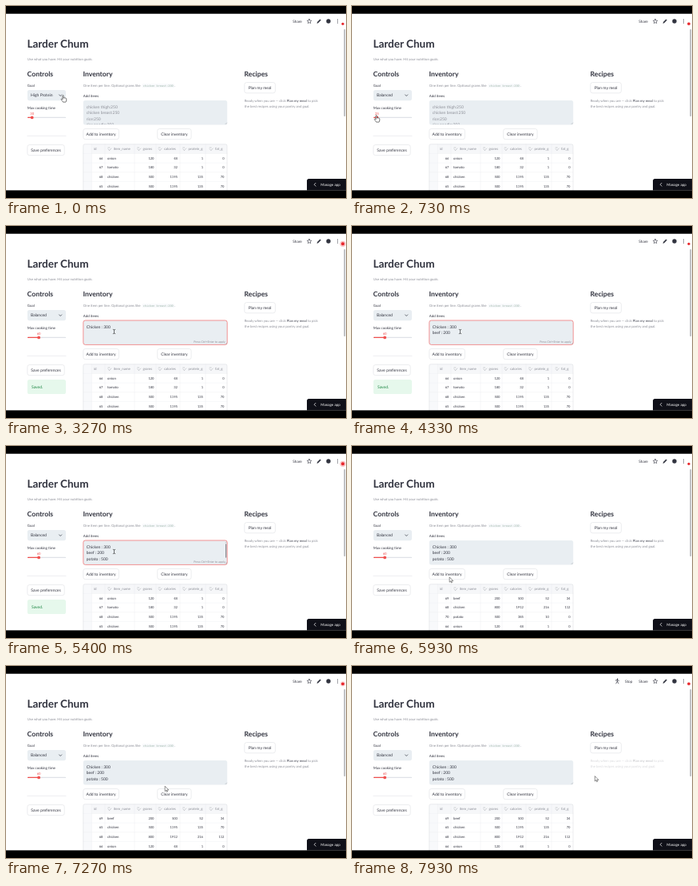
An HTML page that plays this animation: 426 px wide and 240 px high, repeating every 8000 ms.

```html
<!DOCTYPE html>
<html lang="en">
<head>
<meta charset="utf-8">
<title>Meal planner</title>
<style>
html, body { margin: 0; width: 100%; height: 100%; overflow: hidden; background: #fff; }
svg { display: block; width: 100vw; height: 100vh; font-family: Lato, "Open Sans", sans-serif; text-rendering: geometricPrecision; }
.mono { font-family: "DejaVu Sans Mono", monospace; }
</style>
</head>
<body>
<svg id="stage" viewBox="0 0 426 240" xmlns="http://www.w3.org/2000/svg"></svg>
<script>
const LOOP = 8000;
const INK = '#31333f', GREY = '#8b8d96', LINE = '#d9dadf', FIELD = '#e9eef2', RED = '#f0504f';
const stage = document.getElementById('stage');

const clamp = (v, a = 0, b = 1) => Math.min(b, Math.max(a, v));
const smooth = v => v * v * (3 - 2 * v);
const ramp = (t, a, b) => smooth(clamp((t - a) / (b - a)));
const within = (t, a, b) => t >= a && t < b;

// Value at time t along [time, ...values] points.
function track(points, t, ease = v => v) {
  let i = 0;
  while (i < points.length - 2 && t >= points[i + 1][0]) i++;
  const [a, b] = [points[i], points[i + 1]];
  const p = ease(clamp((t - a[0]) / (b[0] - a[0])));
  return a.slice(1).map((v, k) => v + (b[k + 1] - v) * p);
}

const text = (x, y, s, size, fill = INK, extra = '') =>
  `<text x="${x}" y="${y}" font-size="${size}" fill="${fill}" ${extra}>${s}</text>`;
const rect = (x, y, w, h, fill, extra = '') =>
  `<rect x="${x}" y="${y}" width="${w}" height="${h}" fill="${fill}" ${extra}/>`;
const path = (d, stroke, w = 0.6, fill = 'none') =>
  `<path d="${d}" stroke="${stroke}" stroke-width="${w}" fill="${fill}" stroke-linecap="round" stroke-linejoin="round"/>`;
const dot = (x, y, r, fill, extra = '') => `<circle cx="${x}" cy="${y}" r="${r}" fill="${fill}" ${extra}/>`;
const at = (x, y, s) => `<g transform="translate(${x} ${y})">${s}</g>`;

const END = 'text-anchor="end"', MID = 'text-anchor="middle"', BOLD = 'font-weight="700"';

function button(x, y, w, label, hot) {
  const c = hot ? RED : LINE;
  return rect(x, y, w, 13.2, '#fff', `rx="2.6" stroke="${c}" stroke-width=".5"`) +
    text(x + w / 2, y + 8.3, label, 5, hot ? RED : INK, MID);
}

// Timeline
const T = {
  open: 130, pick: 360, savePrefs: 1260, saved: 1450, focus: 1730,
  add: 5620, added: 5830, saveTable: 6560, stored: 6780, plan: 7740, dim: 7870
};

const pointer = [
  [0, 71, 112], [130, 71, 112], [300, 47, 126], [380, 47, 126], [620, 30, 137], [760, 30, 137],
  [1000, 40, 137], [1060, 40, 137], [1240, 50, 179], [1400, 50, 179], [1680, 135.5, 132],
  [5420, 135.5, 132], [5600, 119, 160], [5850, 119, 160], [6200, 142, 191], [6900, 142, 191],
  [7300, 200, 150], [7680, 314, 103], [7770, 314, 103], [7920, 304.3, 138], [8000, 304.3, 138]
];

const NOTE = 'Chicken : 300\nbeef : 200\npotato : 500';
const typing = [[1730, 0.5], [1930, 3.5], [2900, 13], [3400, 13], [4150, 24], [4400, 25], [5200, 37]];
const HINT = ['chicken thigh:250', 'chicken breast:250', 'rice:250', 'rice noodle:250'];

const onion = [66, 'onion', 120, 48, 1, 0];
const tomato = [67, 'tomato', 180, 32, 1, 0];
const chicken = id => [id, 'chicken', 500, 1195, 135, 70];
const beef = [69, 'beef', 200, 500, 52, 34];
const potato = [70, 'potato', 500, 385, 10, 0];
const more = [68, 'chicken', 800, 1912, 216, 112];

function rowsAt(t) {
  if (t < T.added) return [onion, tomato, chicken(68), chicken(65)];
  if (t < T.stored) return [beef, more, potato, onion, tomato, chicken(65)];
  return [beef, chicken(65), more, onion, tomato, potato];
}

function table(rows) {
  const x0 = 96.8, y0 = 172.8, w = 180.2, pitch = 11.65, n = 12, h = 141.2;
  const edges = [107.3, 124, 161, 188, 218, 250];
  const heads = [['id', 110], ['item_name', 134.7], ['grams', 171.5], ['calories', 198], ['protein_g', 228.5], ['fat_g', 262]];
  const right = [121.5, 0, 185.5, 215, 247, 273.5];
  let s = rect(x0, y0, w, h, '#fff', 'rx="2"') +
    rect(x0, y0, w, pitch, '#f6f7f9') + rect(x0, y0, 10.5, h, '#f8f9fb') +
    rect(x0, y0 + pitch * (rows.length + 1), w, pitch, '#f4f6f7');
  for (let i = 1; i <= n; i++) s += path(`M${x0} ${y0 + i * pitch}h${w}`, '#e7e9ec', 0.35);
  for (const x of edges) s += path(`M${x} ${y0}v${h}`, '#e7e9ec', 0.35);
  heads.forEach(([label, x], i) => {
    s += text(x, y0 + 7.2, label, 4.4, GREY);
    if (i) s += path(`M${x - 6.8} ${y0 + 4.2}h2M${x - 6.8} ${y0 + 6}l1.6 1.6M${x - 5} ${y0 + 7.6}l2.2-2.4`, GREY, 0.4);
  });
  rows.forEach((row, r) => row.forEach((v, i) => {
    const y = y0 + pitch * (r + 1) + 7.3;
    s += i === 1 ? text(127, y, v, 4.35) : text(right[i], y, v, 4.1, INK, END);
  }));
  return s + rect(x0, y0, w, h, 'none', `rx="2" stroke="${LINE}" stroke-width=".5"`);
}

function controls(t) {
  const [mins] = track([[0, 30], [560, 30], [720, 25], [760, 25], [1000, 60]], t);
  const value = Math.round(mins / 5) * 5;
  const x = 27 + (value - 10) / 170 * 48;
  const goal = t < T.pick ? 'High Protein' : 'Balanced';
  let s = text(26.6, 87.7, 'Controls', 8.6, INK, BOLD) + text(26.8, 101, 'Goal', 4.4) +
    rect(26.8, 105, 48.2, 13.2, FIELD, 'rx="2.6"') + text(31, 113.3, goal, 5) +
    path('M66.6 110.9l1.6 1.6 1.6-1.6', INK, 0.7) +
    text(26.8, 128.8, 'Max cooking time', 4.5) +
    rect(27, 138.7, 48, 1.3, '#dfe2e7', 'rx=".6"') + rect(27, 138.7, x - 27, 1.3, RED, 'rx=".6"') +
    dot(x, 139.4, 1.9, RED) + text(x, 135.5, value, 4.2, RED, MID) +
    path('M26.8 162.4h48.2', LINE, 0.45) +
    button(26.8, 173.5, 46.4, 'Save preferences', within(t, T.savePrefs - 40, T.savePrefs + 160));
  if (within(t, T.saved, T.added))
    s += rect(26.8, 192, 48.2, 18, '#e6f8ec', 'rx="2.6"') + text(32, 202.8, 'Saved.', 5, '#1e8745');
  if (within(t, T.open, T.pick)) {
    s += rect(26.8, 119.5, 48.2, 37, '#fff', `rx="2.6" stroke="${LINE}" stroke-width=".5"`) +
      rect(27.4, 121, 47, 11, '#f0f2f5');
    ['Balanced', 'High Protein', 'Low Carb'].forEach((o, i) => s += text(31, 128.3 + i * 11.4, o, 5));
  }
  return s;
}

function inventory(t) {
  const focus = within(t, T.focus, T.add);
  const note = NOTE.slice(0, Math.floor(track(typing, t)[0]));
  const typed = t >= T.focus && note;
  const lines = typed ? note.split('\n') : HINT;
  const last = lines.length - 1;
  let s = text(96.6, 87.7, 'Inventory', 8.6, INK, BOLD) +
    text(96.8, 101, 'One item per line. Optional grams like', 4.35, GREY) +
    rect(170.5, 97.3, 40.5, 5, '#f8f9fb', 'rx="1"') +
    text(171.7, 100.8, 'chicken breast:200', 3.5, '#9db5aa', 'class="mono"') + text(211.3, 101, '.', 4.35, GREY) +
    text(96.8, 113.6, 'Add items', 4.4) +
    rect(96.8, 118, 180.4, 30.4, FIELD, `rx="2.6" ${focus ? `stroke="${RED}" stroke-width=".6"` : ''}`) +
    '<g clip-path="url(#area)">' +
    lines.map((l, i) => text(100.8, 127.6 + i * 7.6, l, 5, typed ? INK : GREY)).join('');
  if (focus && (t - T.focus) % 1000 < 500) {
    const units = { i: .24, ' ': .19, ':': .24, C: .65, e: .53, c: .46, k: .5, f: .34, t: .37, a: .49 };
    const w = typed ? [...lines[last]].reduce((sum, c) => sum + (units[c] || 0.57), 0) * 5 : 0;
    s += rect(101.2 + w, 123 + (typed ? last : 0) * 7.6, 0.4, 5.8, INK);
  }
  s += '</g>';
  if (focus) s += text(274.5, 145.5, 'Press Ctrl+Enter to apply', 3.6, GREY, END);
  if (focus && typed && last > 1)
    s += rect(275, 122.2, 1.2, 17.5, '#85888d', 'rx=".6"') +
      path('M275 120.8l.6-.8.6.8M275 145.4l.6.8.6-.8', '#85888d', 0.35);
  s += path('M274.9 147.6l1.7-1.7M276 147.6l.6-.6', '#85888d', 0.3);
  return s + button(96.8, 153.5, 44.6, 'Add to inventory', within(t, T.add - 40, T.add + 200)) +
    button(189.7, 153.5, 42.4, 'Clear inventory') + table(rowsAt(t)) +
    button(96.8, 320.8, 53.6, 'Save inventory table', within(t, T.saveTable - 40, T.saveTable + 200));
}

function recipes(t) {
  return text(298.6, 87.7, 'Recipes', 8.6, INK, BOLD) +
    button(298.8, 95.6, 38.6, 'Plan my meal', within(t, T.plan - 60, T.plan + 70)) +
    `<g opacity="${t >= T.dim ? 0.33 : 1}">` +
    text(298.8, 119.5, 'Ready when you are — click <tspan fill="#5b5d68" font-weight="600">Plan my meal</tspan> to pick', 4.3, GREY) +
    text(298.8, 127, 'the best recipes using your pantry and goal.', 4.3, GREY) + '</g>';
}

function header(t) {
  const busy = within(t, T.savePrefs, T.saved) || within(t, T.add, T.added) ||
    within(t, T.saveTable, T.stored) || t >= T.plan;
  let s = rect(0, 10, 426, 17.6, '#fff') + text(359.3, 20.8, 'Share', 4.7) +
    path('M380 16.3l.8 1.8 2 .2-1.5 1.3.4 2-1.7-1-1.7 1 .4-2-1.5-1.3 2-.2z', INK, 0.6) +
    path('M389.8 21.4l.4-1.5 3.2-3.2 1.1 1.1-3.2 3.2z', INK, 0.3, INK) +
    dot(404, 19, 2.7, INK) + [17, 19, 21].map(y => dot(415.5, y, 0.6, INK)).join('');
  if (busy) {
    const legs = Math.floor(t / 130) % 2 ? 'M332.4 19.3l-1.6 2.6M332.4 19.3l1.5 2.6' : 'M332.4 19.3l-.6 1.4-1.5.3M332.4 19.3l1.3 1-.3 1.7';
    s += dot(332.6, 16.2, 0.8, INK) + path('M332.4 17.5v1.8M330.2 18l2.2-.5 2 .9' + legs, INK, 0.7) +
      text(342, 20.8, 'Stop', 4.7);
  }
  return s;
}

const arrow = path('M0 0v6l1.5-1.3.9 2.1.9-.4-.9-2H4.3z', '#222', 0.5, '#fff');
const hand = path('M-.2 .2c0-.9 1.3-.9 1.3 0V3c1-.4 3.4 0 3.6.9v2c0 1-.6 1.6-.8 2.2H.4C0 7-1.8 5.400-1.900 4.700c0-.7.800-.9 1.700-.1z', '#222', 0.6, '#fff');
const beam = path('M-1.2-2.700Q0-2.700 0-1.900V1.900Q0 2.700-1.200 2.700M1.200-2.700Q0-2.700 0-1.900M0 1.900Q0 2.700 1.200 2.700', '#222', 0.6);

function cursor(t) {
  const [x, y] = track(pointer, t, smooth);
  const overText = x > 97 && x < 277 && y > 118 && y < 148.5 && t < 5900;
  const moving = within(t, 1450, 1680) || within(t, 5850, 6150) || within(t, 6900, 7600) || t > 7800;
  return at(x, y, overText ? beam : moving ? arrow : hand);
}

function draw(t) {
  const scroll = 130 * (ramp(t, 6080, 6300) - ramp(t, 7000, 7250));
  const k = scroll / 130;
  const pulse = Math.max(0, Math.cos((t - 3270) / 2130 * 2 * Math.PI));
  stage.innerHTML =
    '<defs><clipPath id="area"><rect x="97" y="118.500" width="180" height="29.500"/></clipPath></defs>' +
    rect(0, 0, 426, 240, '#fff') +
    at(0, -scroll,
      text(26.4, 52.3, 'Larder Chum', 13.5, INK, BOLD) +
      text(26.8, 67.5, 'Use what you have. Hit your nutrition goals.', 4.28, GREY) +
      controls(t) + inventory(t) + recipes(t)) +
    header(t) +
    rect(423.4, 29 + 58 * k, 1.7, 109 + 15 * k, '#b4b6ba', 'rx=".8"') +
    path('M377 230.500v-12q0-2.500 2.500-2.500H426v14.500z', 'none', 0, '#0f1018') +
    path('M388 221.300l-1.900 1.900 1.900 1.900', '#fff', 0.7) +
    text(394.2, 224.9, 'Manage app', 4.6, '#fff') +
    dot(422, 22.3, 2 + 1.6 * pulse, RED, `opacity="${0.35 * pulse}"`) + dot(422, 22.3, 1.6 + 0.4 * pulse, '#e8262b') +
    cursor(t) +
    rect(0, 0, 426, 9.7, '#000') + rect(0, 230.4, 426, 9.6, '#000');
}

const start = performance.now();
function tick() {
  draw((performance.now() - start) % LOOP);
  requestAnimationFrame(tick);
}
tick();
</script>
</body>
</html>
```
